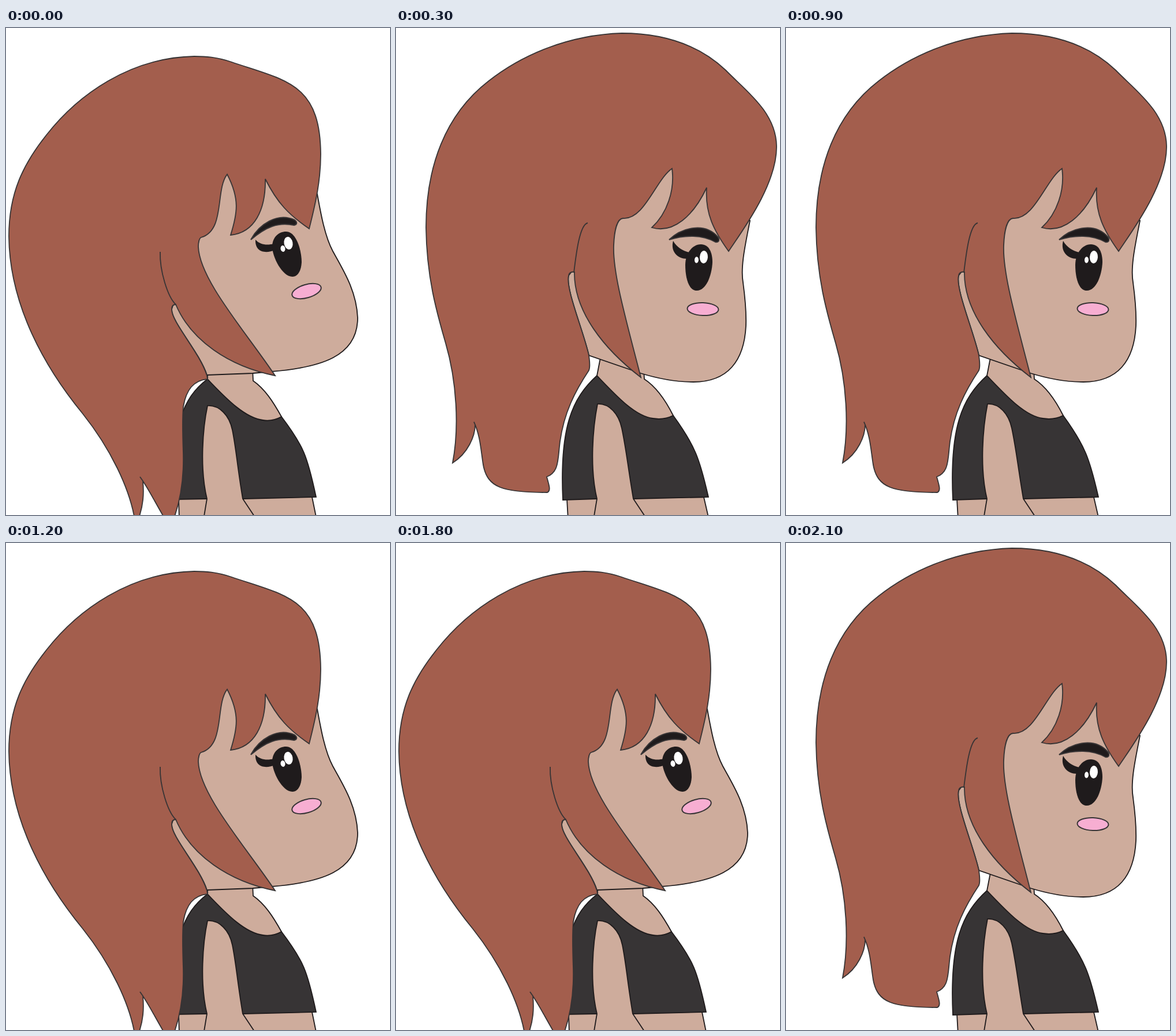
Write an HTML page that moves like this. It is 665 px wide and 842 px high and loops after 2400 ms.

```html
<!DOCTYPE html>
<html lang="en">
<head>
<meta charset="utf-8">
<title>Nodding girl</title>
<style>
  html, body { margin: 0; width: 100%; height: 100%; overflow: hidden; background: #fff; }
  svg { display: block; width: 100vw; height: 100vh; }
</style>
</head>
<body>
<svg id="stage" viewBox="0 0 665 842"></svg>
<script>
const STEP = 300;
const SKIN = '#ceac9c', HAIR = '#a35e4d', DARK = '#373435', INK = '#1f1b1c';

const raised = {
  torso: 'M299 813L300 850H538L530 811Z',
  neck: 'M349 590V607C385 645 415 674 445 678C458 680 468 677 477 672C462 645 448 624 428 610L427 590',
  shirt: 'M349 607C305 640 287 690 290 815L348 814L410 814L537 811C522 740 515 722 477 672C468 677 458 680 445 678C415 674 385 645 349 607Z',
  arm: 'M342 850L348 814C335 760 341 690 349 653C370 652 387 670 392 695C399 730 400 755 410 814L434 850',
  face: 'M539 287C545 320 552 360 566 386C585 420 607 455 609 501C609 568 545 587 460 594L427 597L348 600C335 560 286 508 287 486L330 350L383 240Z',
  fringe: 'M349 607L348 601C335 560 286 508 287 486C287 480 290 478 294 478C320 540 386 585 466 601C415 525 335 435 333 378C333 370 335 363 338 362C380 350 362 280 383 253C405 295 401 320 389 358C430 354 450 315 449 261C470 303 490 323 525 347',
  crown: 'C537 300 545 262 545 218C544 95 485 91 391 59C365 50 345 49 326 49C215 51 125 115 70 185C30 235 5 285 5 360',
  back: 'C6 480 68 588 133 667C180 726 214 795 223 850H229C238 825 239 805 237 783L232 776C245 793 258 820 276 850H290C303 815 308 775 307 735C306 705 305 680 307 655C312 625 325 609 349 607Z',
  strand: 'M267 387C266 420 280 465 294 478',
  eye: 'M485 352C503 352 512 385 512 405C511 422 504 430 496 430C478 430 461 395 461 378C461 362 472 352 485 352Z',
  lash: 'M432 366C440 375 452 376 464 373L466 384C448 391 431 387 432 366Z',
  brow: 'M424 366C438 340 470 318 500 332C505 336 504 340 499 341C471 335 450 344 424 366Z',
  glints: [[489, 372, 7.5, 11, -10], [479.5, 381.5, 4, 5.5, -10]],
  blush: [520.5, 455, 26, 11.5, -16]
};

const lowered = {
  torso: 'M296 814L298 850H542L533 811Z',
  neck: 'M355 565L348 601C385 640 415 671 445 675C458 677 470 675 480 670C465 640 450 620 430 607L429 590',
  shirt: 'M348 601C305 640 283 690 289 816L348 814L411 814L541 811C526 745 518 722 480 670C470 675 458 677 445 675C415 671 385 640 348 601Z',
  arm: 'M342 850L348 814C335 760 341 690 349 650C370 649 386 668 391 692C399 730 401 755 411 814L435 850',
  face: 'M613 333C606 370 596 412 601 440C605 470 607 490 606 515C603 575 575 612 515 612C485 612 450 605 424 597L334 566C325 525 293 450 299 428L380 320L478 230Z',
  fringe: 'M334 592C337 585 335 575 334 566C325 525 293 450 299 428C300 423 303 421 309 422C308 490 360 555 424 604C400 510 375 425 377 376C378 350 383 330 393 329C430 332 450 262 478 243C483 280 470 320 443 345C480 356 515 325 538 276C535 320 550 350 576 386',
  crown: 'C600 350 660 270 659 204C658 145 605 108 571 73C520 25 455 9 391 9C300 12 220 45 160 92C85 150 52 240 52 345',
  back: 'C53 430 70 490 86 545C105 610 110 690 98 752C125 735 137 705 137 686L135 681C146 705 147 730 151 755C158 795 185 803 262 803C268 800 266 793 261 776C283 768 280 745 284 715C291 665 310 628 334 592Z',
  strand: 'M332 337C318 340 312 390 308 423',
  eye: 'M528 374C542 374 548 388 548 405C547 428 537 454 521 454C506 454 501 430 501 410C501 390 513 374 528 374Z',
  lash: 'M480 368C486 379 496 385 508 388L504 399C487 399 475 386 480 368Z',
  brow: 'M473 366C495 345 535 335 558 362C561 368 558 371 553 370C530 357 500 358 473 366Z',
  glints: [[533, 396, 7, 11, 3], [520.5, 401, 3.5, 5.5, 3]],
  blush: [531.5, 486, 27, 11, 2]
};

const path = (d, fill, stroke = INK, width = 1.8) =>
  `<path d="${d}" fill="${fill}" stroke="${stroke}" stroke-width="${width}"/>`;

const oval = ([x, y, rx, ry, turn], fill, stroke = 'none') =>
  `<ellipse cx="${x}" cy="${y}" rx="${rx}" ry="${ry}" fill="${fill}" stroke="${stroke}" stroke-width="2" transform="rotate(${turn} ${x} ${y})"/>`;

const drawPose = p => '<g>' + [
  path(p.torso, SKIN),
  path(p.shirt, DARK),
  path(p.neck, SKIN),
  path(p.arm, SKIN),
  path(p.face, SKIN),
  path(p.fringe + p.crown + p.back, HAIR, DARK),
  path(p.strand, 'none', DARK),
  path(p.lash, INK, 'none'),
  path(p.eye, INK, 'none'),
  ...p.glints.map(g => oval(g, '#fff')),
  path(p.brow, INK, DARK, 2),
  oval(p.blush, '#f7aed2', DARK)
].join('') + '</g>';

const stage = document.getElementById('stage');
stage.innerHTML = drawPose(raised) + drawPose(lowered);
const poses = [...stage.children];

function render(time) {
  const active = Math.floor(time / STEP) % poses.length;
  poses.forEach((pose, i) => pose.setAttribute('display', i === active ? 'inline' : 'none'));
}

const start = performance.now();
function tick() {
  render(performance.now() - start);
  requestAnimationFrame(tick);
}
tick();
</script>
</body>
</html>
```
